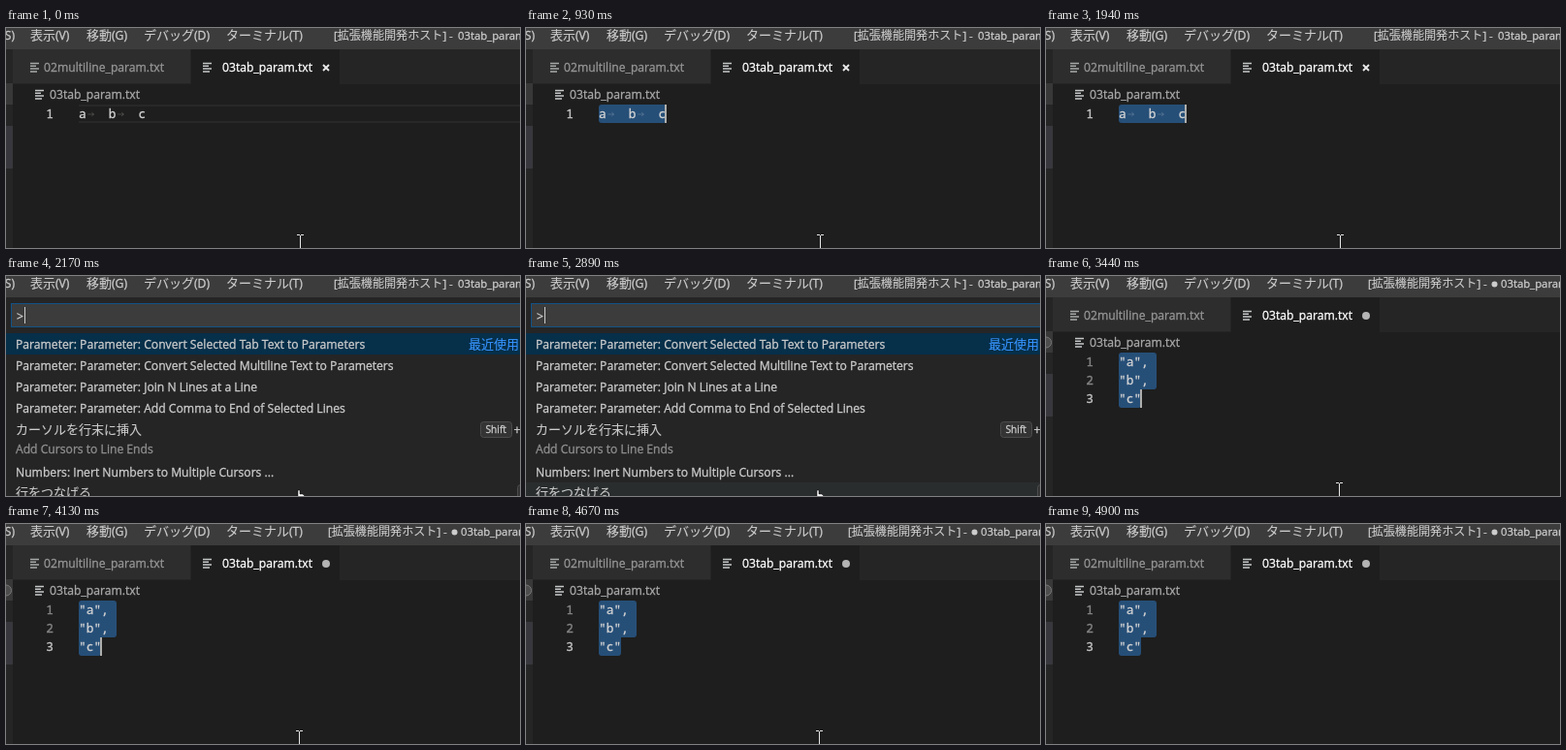
An HTML page that plays this animation: 530 by 227 pixels, repeating every 5.05 s.

```html
<!DOCTYPE html>
<html lang="ja">
<head>
<meta charset="utf-8">
<title>Tab text to parameters</title>
<style>
  html, body { margin: 0; width: 100%; height: 100%; overflow: hidden; background: #1e1e1e; }
  svg { display: block; }
  text {
    font: 12.15px "Open Sans", "Noto Sans CJK JP", "Noto Sans CJK", sans-serif;
    color: #ccc; fill: currentColor; stroke: currentColor; stroke-width: .3px;
  }
  .cjk { font-family: "Noto Sans CJK JP", "Noto Sans CJK", sans-serif; font-size: 1.07em; stroke-width: .1px; }
  .title text { font-size: 11.3px; }
  .code text { font: 12.83px "Noto Sans Mono", "DejaVu Sans Mono", monospace; color: #d4d4d4; }
  .code .num { color: #858585; }
  .code .now { color: #c6c6c6; }
  .sel { fill: #264f78; }
  .caret { fill: #aeafad; }
  .key { fill: #343435; stroke: #4c4c4d; }
</style>
</head>
<body>
<svg width="530" height="227" viewBox="0 0 530 227">
  <defs>
    <path id="file" d="M0 .5h9M0 3.3h6M0 6.1h9M0 8.9h7" stroke="#c5c8c9" stroke-width="1.5"/>
    <path id="arrow" d="M0 3h6M3.8 1l2.2 2-2.2 2" fill="none" stroke="#e3e4e2" stroke-opacity=".2"/>
    <path id="beam" d="M0 .5h3M4 .5h3M3.5 1v13" fill="none" stroke="#e8e8e8"/>
    <path id="pointer" d="M0 1h2v4h3l2 2v6h-7z" fill="#fff" stroke="#000" stroke-width=".5"/>
  </defs>

  <!-- side bar, tabs and breadcrumb -->
  <rect y="22" width="530" height="36" fill="#252526"/>
  <rect y="22" width="7" height="205" fill="#252526"/>
  <rect y="57" width="7" height="22" fill="#383838"/>
  <rect y="101" width="7" height="44" fill="#37373d"/>
  <rect x="7" y="22" width="183" height="35" fill="#2d2d2d"/>
  <rect x="191" y="22" width="153" height="36" fill="#1e1e1e"/>
  <use href="#file" x="25" y="36" opacity=".8"/>
  <text x="39" y="45" style="color:#969696">02multiline_param.txt</text>
  <use href="#file" x="203" y="36"/>
  <text x="223" y="45" style="color:#fff">03tab_param.txt</text>
  <path data-on="0-3180" d="M327 38l6 6m0-6l-6 6" stroke="#e8e8e8" stroke-width="1.9"/>
  <circle data-on="3180-5050" cx="330" cy="41" r="4" fill="#b5b5b5"/>
  <use href="#file" x="30" y="64"/>
  <text x="45" y="73" style="color:#a9a9a9">03tab_param.txt</text>
  <circle data-on="3440-5050" cx="0" cy="68.5" r="5.5" fill="#4d4d4d" stroke="#777"/>

  <!-- one line, tab separated -->
  <g class="code" data-on="0-3180">
    <path data-on="0-930" d="M75 80h455M75 97h455" stroke="#282828" stroke-width="2"/>
    <rect data-on="930-3180" class="sel" x="75" y="79" width="70" height="19" rx="3"/>
    <text class="now" x="41.3" y="93">1</text>
    <text x="75 105.8 136.6" y="93">abc</text>
    <use href="#arrow" x="84.5" y="86"/>
    <use href="#arrow" x="115.3" y="86"/>
    <rect data-on="260-720 930-1410 1940-3180" class="caret" x="143" y="79" width="2" height="19"/>
  </g>

  <!-- three quoted lines -->
  <g class="code" data-on="3180-5050">
    <path class="sel" d="M78 79h33q3 0 3 3v32q0 3-3 3h-13v16q0 3-3 3h-17q-3 0-3-3v-51q0-3 3-3z"/>
    <text class="num" x="41.3" y="93">1</text>
    <text class="num" x="41.3" y="112">2</text>
    <text class="now" x="41.3" y="131">3</text>
    <text x="75" y="93">"a",</text>
    <text x="75" y="112">"b",</text>
    <text x="75" y="131">"c"</text>
    <rect data-on="3180-3640 4130-4670" class="caret" x="97" y="117" width="2" height="19"/>
  </g>

  <!-- command palette -->
  <g data-on="2170-3100">
    <rect y="22" width="530" height="205" fill="#252526"/>
    <rect x="5.5" y="28.5" width="540" height="24" fill="#3c3c3c" stroke="#125386"/>
    <text x="11" y="46">&gt;</text>
    <rect data-on="2170-2430 2890-3100" x="19" y="32" width="1" height="17" fill="#ccc"/>
    <rect y="59" width="530" height="22" fill="#062f4a"/>
    <rect data-on="2340-3100" y="213" width="530" height="14" fill="#2a2d2e"/>
    <text x="10" y="75">Parameter: Parameter: Convert Selected Tab Text to Parameters</text>
    <text x="477" y="75" style="color:#3794ff">最近使用したもの</text>
    <text x="10" y="97">Parameter: Parameter: Convert Selected Multiline Text to Parameters</text>
    <text x="10" y="119">Parameter: Parameter: Join N Lines at a Line</text>
    <text x="10" y="141">Parameter: Parameter: Add Comma to End of Selected Lines</text>
    <text x="10" y="163">カーソルを行末に挿入</text>
    <text x="10" y="183" style="color:#8f8f8f">Add Cursors to Line Ends</text>
    <text x="10" y="207">Numbers: Inert Numbers to Multiple Cursors ...</text>
    <text x="10" y="228">行をつなげる</text>
    <rect class="key" x="489.5" y="150.5" width="32" height="16" rx="3"/>
    <text x="494.5" y="162" style="font-size:10.2px">Shift</text>
    <text x="523.5" y="163">+</text>
    <rect class="key" x="527.5" y="215.5" width="30" height="16" rx="3"/>
  </g>

  <!-- title bar -->
  <rect width="530" height="22" fill="#3c3c3c"/>
  <text x="9" y="12" text-anchor="end">選択(S)</text>
  <text x="25" y="12">表示(V)</text>
  <text x="83" y="12">移動(G)</text>
  <text x="142" y="12">デバッグ(D)</text>
  <text x="227" y="12">ターミナル(T)</text>
  <g class="title" data-on="0-3180">
    <text x="338" y="12">[拡張機能開発ホスト]</text>
    <text x="457" y="12">-</text>
    <text x="466" y="12">03tab_param.txt</text>
  </g>
  <g class="title" data-on="3180-5050">
    <text x="332" y="12">[拡張機能開発ホスト]</text>
    <text x="451" y="12">-</text>
    <circle cx="462.5" cy="8.5" r="3" fill="#ccc"/>
    <text x="469" y="12">03tab_param.txt</text>
  </g>

  <!-- mouse -->
  <use data-on="0-2170" href="#beam" x="300" y="213"/>
  <use data-on="2170-2340" href="#pointer" x="301" y="220"/>
  <use data-on="2340-3100" href="#pointer" x="300" y="220"/>
  <use data-on="3100-4900" href="#beam" x="299" y="213"/>
</svg>
<script>
  const LOOP = 5050;

  // Japanese runs are set a little larger than the Latin beside them
  for (const el of document.querySelectorAll('text'))
    el.innerHTML = el.innerHTML.replace(/[\u3040-\u30ff\u4e00-\u9fff]+/g, '<tspan class="cjk">$&</tspan>');

  const parts = [...document.querySelectorAll('[data-on]')].map(el => ({
    el, spans: el.dataset.on.split(' ').map(s => s.split('-').map(Number))
  }));

  const start = performance.now();
  function draw() {
    const t = (performance.now() - start) % LOOP;
    for (const { el, spans } of parts)
      el.style.display = spans.some(([a, b]) => t >= a && t < b) ? '' : 'none';
    requestAnimationFrame(draw);
  }
  draw();
</script>
</body>
</html>
```
